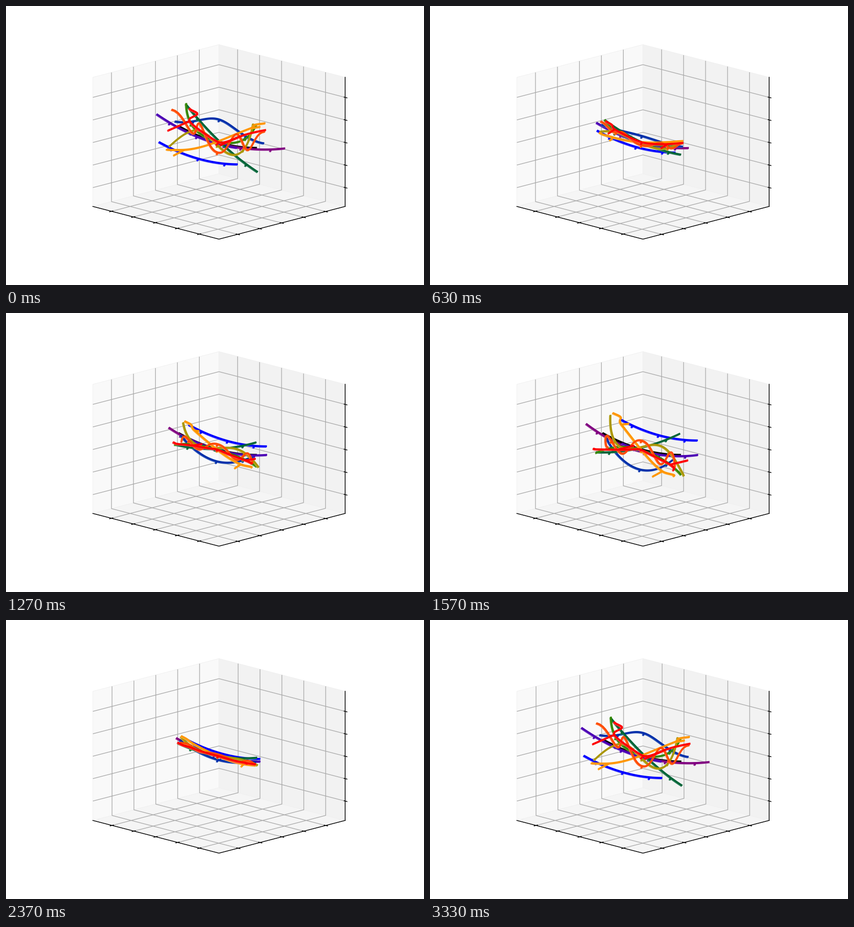
A matplotlib script that plays this animation: 917x611 px, repeating every 3.36 s.

```python
import numpy as np
import matplotlib.pyplot as plt
from matplotlib.animation import FuncAnimation
from matplotlib.colors import to_rgb

W, H, DPI = 917, 611, 100
FRAMES, LOOP_MS = 101, 3360
TURN = 50                          # frame at which the swing reverses
PX = 72 / DPI                      # points per pixel

# Orthographic box seen from 15 degrees above, in stage pixels
SLOPE = np.sin(np.radians(15))
LEFT, MID, RIGHT = 190, 466.7, 743.4
HALF = MID - LEFT
DROP = HALF * SLOPE
TOP, SIDE_BOTTOM = 84, 438.5
SIDE_TOP, BACK, FRONT = TOP + DROP, SIDE_BOTTOM - DROP, SIDE_BOTTOM + DROP

S = np.linspace(0, 1, 81)          # position along the beam
U = 2 * S - 1                      # the same, from -1 to 1
STUB_S = np.array([0.165, 0.5, 0.84])
STUB_U = 2 * STUB_S - 1
HANG = np.array([-2, 5])           # rest offset of a stub's tip
TWIST_DIR = np.array([-46, 16])    # how a stub's tip moves when the beam twists
GAP = [[np.nan, np.nan]]


def beam(s):
    return np.column_stack([378 + 172 * s, 310 - 48 * (1 - s) ** 2])


def bump(s, at, width):
    return np.exp(-((s - at) / width) ** 2)


def ramp(a, b):
    return a + (b - a) * S


class Mode:
    """Displacement (dx, dy) along the beam at full swing, with optional twist."""

    def __init__(self, color, dx, dy, twist=lambda u: 0 * u):
        self.color = color
        self.shift = np.column_stack([dx, dy])
        self.root_shift = np.column_stack([np.interp(STUB_S, S, d) for d in (dx, dy)])
        self.tip_shift = self.root_shift + np.outer(twist(STUB_U), TWIST_DIR)

    def pose(self, amp):
        roots = beam(STUB_S) + amp * self.root_shift
        tips = beam(STUB_S) + HANG + amp * self.tip_shift
        parts = [beam(S) + amp * self.shift]
        for root, tip in zip(roots, tips):
            parts += [GAP, [root, tip]]
        return np.vstack(parts)


def ripple():
    """Wave that shortens towards both ends."""
    r = np.abs(U)
    wave = np.cos(np.pi * (1.2 * r + 1.8 * r**2))
    return -1 - 20 * r**2 + (23 - 8 * r**2) * wave


MODES = [
    # rest shape, shifts and rotations
    Mode("#000000", ramp(0, 0), ramp(0, 0)),
    Mode("#800080", ramp(41, 62), ramp(23, 1)),
    Mode("#4b00b4", ramp(-48, -43), ramp(-26, 0)),
    Mode("#0000ff", ramp(-43, -42), ramp(35, 36)),
    # bending
    Mode("#002faa", 4 - 12 * U + 24 * U**3,
         -10 - 40 * np.abs(np.sin(np.pi * S)) ** 1.4),
    Mode("#006437", ramp(16, 2), ramp(-48, 53)),
    Mode("#328700", 12 * U - 21 * U**3 + 8 * U**4, -2 - 30 * U**2 - 18 * U**4),
    Mode("#aa9600", -9 * U + 10 * U**2 + 15 * U**3 - 24 * U**4,
         6 + 54 * U - 10 * U**2 - 103 * U**3),
    # twisting
    Mode("#ff9600", 22 * U - 14 * bump(np.abs(U), 0.88, 0.1),
         -2 - 65 * U + 13 * U**3, twist=lambda u: -0.72 * u),
    Mode("#ff4b00", 18 * U**11 + 12 * bump(S, 0.12, 0.1), ripple()),
    Mode("#ff0000", 3 - 45 * U**2 + 62 * U**4 + 26 * bump(S, 0.07, 0.05),
         4 - 43 * np.hypot(U, 0.1), twist=lambda u: 0.1 + 2 * u**2),
]

fig = plt.figure(figsize=(W / DPI, H / DPI), dpi=DPI, facecolor="white")
ax = fig.add_axes([0, 0, 1, 1])
ax.set(xlim=(-0.5, W - 0.5), ylim=(H - 0.5, -0.5))   # pixel centres on integers
ax.axis("off")


def pane(corners, color):
    ax.fill(*zip(*corners), facecolor=color, edgecolor="#f0f0f0", lw=PX, zorder=0)


pane([(LEFT, SIDE_TOP), (MID, TOP), (MID, BACK), (LEFT, SIDE_BOTTOM)], "#f9f9f9")
pane([(LEFT, SIDE_BOTTOM), (MID, BACK), (RIGHT, SIDE_BOTTOM), (MID, FRONT)], "#f5f5f5")
pane([(MID, TOP), (RIGHT, SIDE_TOP), (RIGHT, SIDE_BOTTOM), (MID, BACK)], "#f2f2f2")


def joined(paths):
    return np.vstack([np.vstack([p, GAP]) for p in paths])


def sloped(x, y, before, after):
    """Short tick through (x, y); a negative reach tilts it the other way."""
    return [(x - abs(before), y - before * SLOPE), (x + abs(after), y + after * SLOPE)]


def grid_paths(first, step, z_step):
    """Grid lines and ticks for one setting of the axis limits."""
    lines, ticks = [], []
    for k in range(5):
        x = first + step * k
        u = x + HALF
        rise = (x - LEFT) * SLOPE
        z = 199.6 + z_step * k
        lines += [
            [(x, SIDE_BOTTOM + rise), (u, BACK + rise), (u, TOP + rise)],
            [(u, FRONT - rise), (x, SIDE_BOTTOM - rise), (x, SIDE_TOP - rise)],
            [(LEFT, z), (MID, z - DROP), (RIGHT, z)],
        ]
        ticks += [
            sloped(x, SIDE_BOTTOM + rise, -5, -4),
            sloped(u, FRONT - rise, 4, 5),
            sloped(RIGHT, z, 3, 5),
        ]
    return joined(lines), joined(ticks)


GRIDS = [grid_paths(230.9, 48.2, 49.4), grid_paths(232.1, 48, 49.1)]


def line(x, y, color, width, z, cap="butt"):
    return ax.plot(x, y, color=color, lw=width * PX, solid_capstyle=cap,
                   solid_joinstyle="round", zorder=z)[0]


grid = line([], [], "#b0b0b0", 1.6, 1)
marks = line([], [], "black", 1.6, 2)
line([LEFT, MID, RIGHT], [SIDE_BOTTOM, FRONT, SIDE_BOTTOM], "black", 1.6, 2, "projecting")
line([RIGHT, RIGHT], [SIDE_BOTTOM, SIDE_TOP], "black", 1.6, 2, "projecting")


def pale(color):
    if color == "#000000":
        return color
    return tuple(0.78 * c + 0.22 for c in to_rgb(color))


strokes = [(line([], [], pale(m.color), 4, 3 + i), line([], [], m.color, 4, 3.5 + i))
           for i, m in enumerate(MODES)]


def rescaled(p):
    """Small shift of the data once the axis limits have widened."""
    x, y = p.T
    return np.column_stack([x + 1.7 - 0.0036 * (x - 350), y - 0.8])


def draw(k):
    amp = 2 * abs(k - TURN) / TURN - 1
    widened = k >= TURN
    lines, ticks = GRIDS[widened]
    grid.set_data(*lines.T)
    marks.set_data(*ticks.T)
    for (shade, main), mode in zip(strokes, MODES):
        p = mode.pose(amp)
        if widened:
            p = rescaled(p)
        main.set_data(*p.T)
        shade.set_data(*(p + [-1.2, 1.2]).T)
    return [grid, marks]


anim = FuncAnimation(fig, draw, frames=FRAMES, interval=LOOP_MS / FRAMES,
                     repeat=True, repeat_delay=0, blit=False)
plt.show()
```
